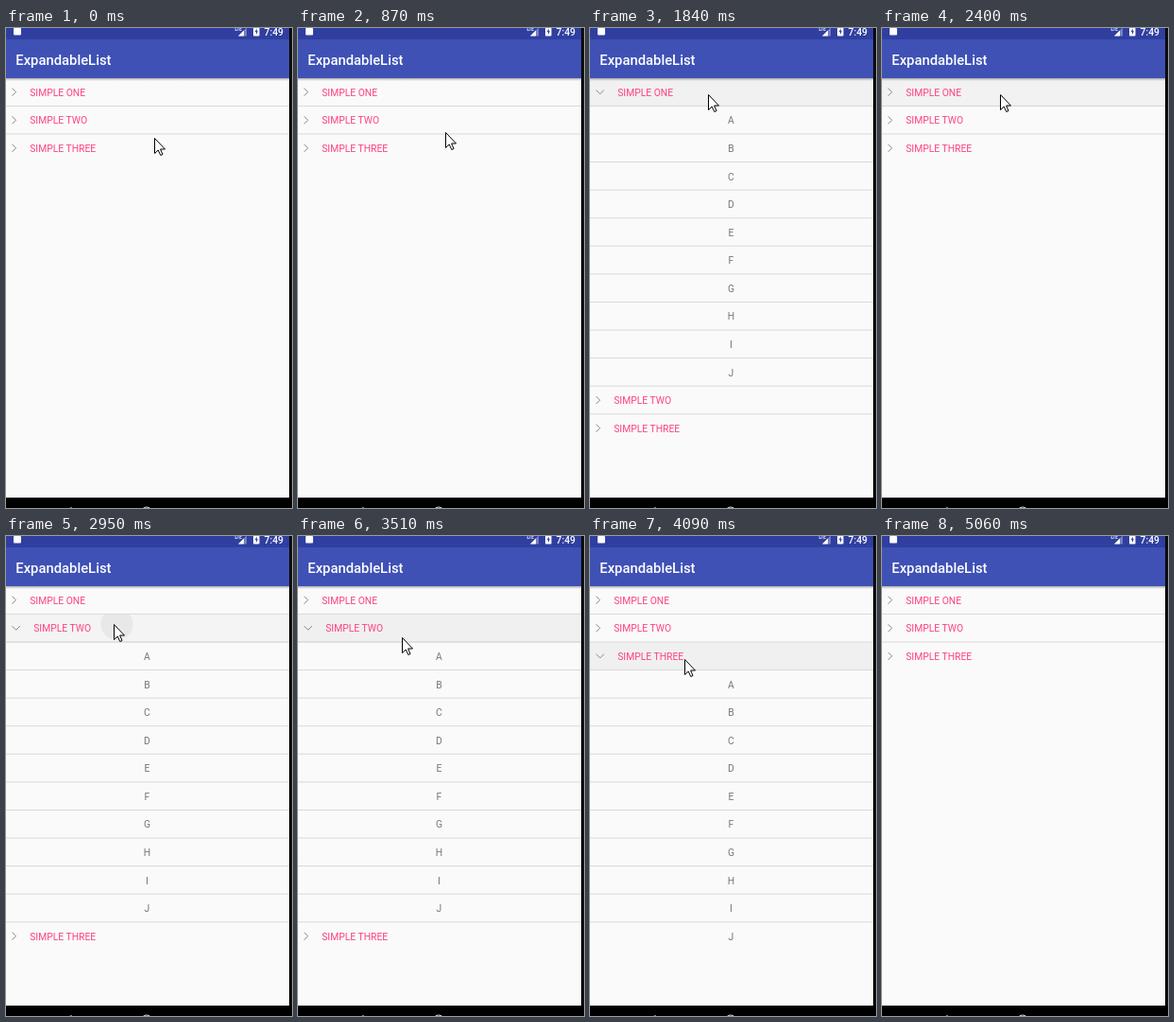
Animation of 303x507 px, one loop 5360 ms. Source, as an HTML page:

```html
<!DOCTYPE html>
<html lang="en">
<head>
<meta charset="utf-8">
<title>ExpandableList</title>
<style>
  html, body { margin: 0; width: 100%; height: 100%; overflow: hidden; background: #0b0b0d; }
  svg { display: block; width: 303px; height: 507px; font-family: Roboto, "Noto Sans", sans-serif; }
  .group { font-size: 10.35px; fill: #ff4081; }
  .child { font-size: 10.35px; fill: #757575; text-anchor: middle; }
  .chevron { fill: none; stroke: #858585; stroke-width: 1; }
</style>
</head>
<body>
<svg viewBox="0 0 303 507">
  <defs>
    <linearGradient id="shade" x2="0" y2="1">
      <stop offset="0" stop-opacity=".3"/>
      <stop offset="1" stop-opacity="0"/>
    </linearGradient>
    <clipPath id="rowClip"><rect id="clipRect" width="300" height="29.6"/></clipPath>
  </defs>
  <rect width="300" height="496" fill="#fafafa"/>
  <g id="list"></g>

  <rect y="53" width="300" height="3" fill="url(#shade)"/>
  <rect width="300" height="53" fill="#3f51b5"/>
  <rect width="300" height="12" fill="#303f9f"/>
  <text x="10.3" y="38.6" font-size="14.8" font-weight="500" fill="#fff">ExpandableList</text>

  <rect x="8" y="0" width="8" height="7.5" rx="1" fill="#fff"/>
  <path d="M246 8.5H255V-.5Z" fill="#fff" opacity=".35"/>
  <path d="M246 8.5H252V2.5Z" fill="#fff"/>
  <text x="242.5" y="3" font-size="4.5" font-weight="700" fill="#fff">LTE</text>
  <rect x="262" y="-1" width="6.5" height="9.5" rx=".7" fill="#fff"/>
  <path d="M265.8 .5L263.6 4.3H265V7L267 3.3H265.8Z" fill="#303f9f"/>
  <text x="273.6" y="7.8" font-size="10.35" font-weight="500" fill="#fff">7:49</text>

  <rect y="496" width="303" height="11" fill="#000"/>
  <path d="M66 508L69.5 505.8V508Z" fill="#ddd"/>
  <circle cx="149" cy="511" r="5" fill="none" stroke="#ddd" stroke-width="1.2"/>

  <path id="cursor" d="M.5 .5V16.5L4.2 13L6.8 18.5L9 17.5L6.6 12H11.5Z"
        fill="#fff" stroke="#000" stroke-width="1"/>
</svg>
<script>
  const LOOP = 5360, TOP = 53, ROW = 29.58;
  const GROUPS = ["SIMPLE ONE", "SIMPLE TWO", "SIMPLE THREE"];
  const CHILDREN = [..."ABCDEFGHIJ"];
  const $ = id => document.getElementById(id);

  // time, cursor [x, y], open group, pressed group, row tint, ripple [x, y, r]
  const STEPS = [
    [0, [157, 116]],
    [870, [156, 110]],
    [1020, [147, 97]],
    [1140, [137, 83]],
    [1260, [128, 70]],
    [1570, [125, 70], 0, 0, "#f3f3f3", [131, 70, 28]],
    [1840, [125, 70], 0, 0, "#f1f1f1"],
    [2400, [125, 70], -1, 0, "#f2f2f2"],
    [2550, [119, 82]],
    [2670, [114, 93]],
    [2950, [114, 93], 1, 1, "#f4f4f4", [117.5, 93, 17]],
    [3090, [114, 93], 1, 1, "#f3f3f3", [124, 93, 63]],
    [3370, [114, 93], 1, 1, "#f1f1f1"],
    [3510, [110, 107], 1, 1, "#f0f0f0"],
    [3630, [101, 125]],
    [3790, [100, 130]],
    [4090, [100, 130], 2, 2, "#f0f0f0"],
    [4630, [100, 130], -1, 2, "#f2f2f2"],
    [4900, [127, 248]],
    [5060, null]
  ];

  function groupRow(name, y, open) {
    const mid = y + 14.9;
    const arrow = open ? `M6.5 ${mid - 2.4}l4.2 4.2l4.2 -4.2` : `M6.5 ${mid - 4.2}l4 4l-4 4`;
    return `<path class="chevron" d="${arrow}"/>
      <text class="group" x="${open ? 29.2 : 25.2}" y="${y + 18.8}">${name}</text>`;
  }

  function pressedRow(y, tint, ripple) {
    $("clipRect").setAttribute("y", y);
    const wave = ripple
      ? `<circle cx="${ripple[0]}" cy="${ripple[1]}" r="${ripple[2]}" fill="#e8e8e8"
          opacity="${ripple[2] < 20 ? 1 : .5}" clip-path="url(#rowClip)"/>`
      : "";
    return `<rect y="${y}" width="300" height="${ROW}" fill="${tint}"/>${wave}`;
  }

  function draw([, cursor, open = -1, pressed = -1, tint, ripple]) {
    let html = "", y = TOP;
    const divider = () => y > TOP
      ? `<rect y="${y - .7}" width="300" height="1" fill="#d9d9d9"/>` : "";

    GROUPS.forEach((name, i) => {
      if (i === pressed) html += pressedRow(y, tint, ripple);
      html += divider() + groupRow(name, y, i === open);
      y += ROW;
      if (i !== open) return;
      for (const letter of CHILDREN) {
        html += divider() + `<text class="child" x="149.4" y="${y + 18.8}">${letter}</text>`;
        y += ROW;
      }
    });
    // the pressed tint must not cover the divider below it
    if (pressed >= 0 && pressed < 2 || open === 2) {
      y = TOP + (pressed + 1) * ROW;
      html += divider();
    }
    $("list").innerHTML = html;
    $("cursor").style.display = cursor ? "" : "none";
    if (cursor) $("cursor").setAttribute("transform", `translate(${cursor})`);
  }

  let shown;
  const start = performance.now();
  function tick() {
    const t = (performance.now() - start) % LOOP;
    const step = STEPS.findLast(s => s[0] <= t);
    if (step !== shown) draw(shown = step);
    requestAnimationFrame(tick);
  }
  tick();
</script>
</body>
</html>
```
